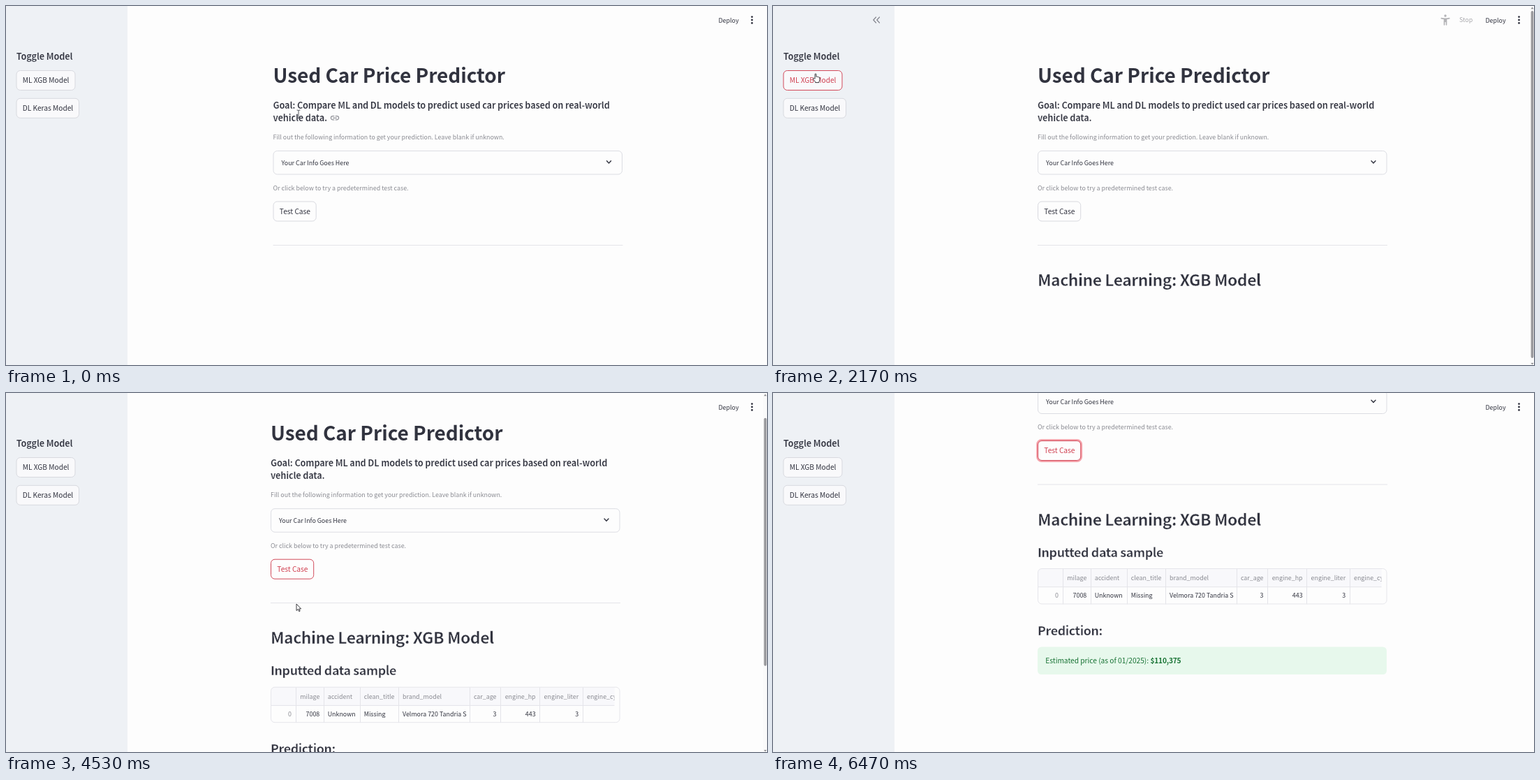
Animation of 1090 by 514 pixels, one loop 6500 ms. Source, as an HTML page:

```html
<!DOCTYPE html>
<html lang="en">
<head>
<meta charset="utf-8">
<title>Used Car Price Predictor</title>
<style>
html, body { margin: 0; width: 100%; height: 100%; overflow: hidden; background: #fdfdfd; }
svg { display: block; width: 1090px; height: 514px; }
text { font-family: "Noto Sans CJK JP", "Noto Sans CJK SC", "Noto Sans CJK", "Open Sans", sans-serif; font-size: 8.9px; fill: #31333f; white-space: pre; }
.h1 { font-size: 28px; font-weight: 700; letter-spacing: -.04px; }
/* a thin background outline lightens bold to semibold */
.h2, .h3, .h5 { font-weight: 600; stroke: #fdfdfd; stroke-width: .018em; }
.h2 { font-size: 22.9px; letter-spacing: -.45px; }
.h3 { font-size: 17.8px; letter-spacing: -.36px; }
.h5 { font-size: 12.7px; letter-spacing: -.16px; }
.h5.side { stroke: #eef1f5; }
.btn text { font-size: 10.17px; }
.btn rect { fill: #fdfdfd; stroke: #d8d9df; }
.btn.side rect { fill: #f9f9fb; }
.btn.red rect { stroke: #d24a5a; }
.btn.red text { fill: #d03f50; }
.btn .ring { display: none; fill: none; stroke-width: 2.4; }
.btn.focus .ring { display: block; stroke: #f5a3ab; }
.cap, .head { fill: #8a8b92; }
.end { text-anchor: end; }
.box { fill: none; stroke: #dcdde3; }
.rule { stroke: #e4e4e9; }
.icon { fill: none; stroke: #31333f; stroke-width: 1.4; stroke-linecap: round; stroke-linejoin: round; }
.soft { stroke: #8f9097; stroke-width: 1.2; }
.good { font-size: 10.17px; fill: #177233; }
.good tspan { font-weight: 700; letter-spacing: -.15px; }
.cur { fill: #fff; stroke: #26262c; stroke-width: .9; stroke-linejoin: round; }
</style>
</head>
<body>
<svg viewBox="0 0 1090 514">
  <defs>
    <g id="chain" class="icon soft">
      <path d="M-1.2 -2.6H-3A2.6 2.6 0 0 0 -3 2.6H-1.2M1.2 -2.6H3A2.6 2.6 0 0 1 3 2.6H1.2M-2.4 0H2.4"/>
    </g>
    <clipPath id="cells"><rect x="380" y="463" width="491.5" height="51"/></clipPath>
  </defs>

  <g id="page">
    <text class="h1" x="379" y="110">Used Car Price Predictor</text>
    <text class="h5" x="379" y="147.3">Goal: Compare ML and DL models to predict used car prices based on real-world</text>
    <text class="h5" x="379" y="164.6">vehicle data.</text>
    <use id="goalLink" href="#chain" x="467.5" y="160.3"/>
    <text class="cap" x="379" y="191.2">Fill out the following information to get your prediction. Leave blank if unknown.</text>
    <rect class="box" x="379.5" y="207.5" width="499.5" height="33.5" rx="5.5"/>
    <text x="391" y="227.6">Your Car Info Goes Here</text>
    <path class="icon" d="M857 221.8L860 225L863 221.8"/>
    <text class="cap" x="379" y="263.9">Or click below to try a predetermined test case.</text>
    <g class="btn" id="test">
      <rect class="ring" x="378.3" y="278.8" width="63.6" height="30.4" rx="6.5"/>
      <rect x="379.5" y="280" width="61.2" height="28" rx="5.5"/>
      <text x="388.3" y="297.6">Test Case</text>
    </g>
    <path class="rule" d="M379 342.5H880"/>

    <g id="model">
      <text class="h2" x="379" y="401">Machine Learning: XGB Model</text>
      <use id="modelLink" href="#chain" x="709.5" y="394.5"/>
    </g>
    <text class="h3" id="sample" x="379" y="446.2">Inputted data sample</text>
    <rect id="skeleton" x="379" y="463" width="500" height="30.5" rx="5.5" fill="#f6f6fa"/>
    <g id="result">
      <path d="M379.5 489.2V468.5a5.5 5.5 0 0 1 5.5 -5.5H871.5V489.2Z" fill="#f8f8fb"/>
      <g id="grid" clip-path="url(#cells)"></g>
      <rect class="box" x="379.5" y="463" width="499.5" height="50.5" rx="5.5" style="stroke:#e6e6eb"/>
      <text class="h3" x="379" y="558.2">Prediction:</text>
      <rect x="379" y="575" width="500" height="39.5" rx="5.5" fill="#e7f8ec"/>
      <text class="good" x="390.3" y="598.5">Estimated price (as of 01/2025): <tspan>$110,375</tspan></text>
    </g>
  </g>

  <rect width="174" height="514" fill="#eef1f5"/>
  <path id="fold" class="icon soft" style="stroke:#85868f" d="M147.5 16L143.8 20L147.5 24M152.5 16L148.8 20L152.5 24"/>
  <text class="h5 side" x="14.7" y="76.8">Toggle Model</text>
  <g class="btn side" id="ml">
    <rect x="15" y="92.5" width="84" height="28" rx="5.5"/>
    <text x="23.7" y="109.9">ML XGB Model</text>
  </g>
  <g class="btn side">
    <rect x="15" y="132.3" width="89.5" height="28" rx="5.5"/>
    <text x="23.7" y="149.8">DL Keras Model</text>
  </g>

  <g id="busy">
    <g class="icon" style="stroke:#b3b3b6;stroke-width:1.6">
      <path d="M957.3 17.6Q963 19 968.7 17.6M961.5 19V27M964.5 19V27M963 19V22.5"/>
      <circle cx="963" cy="14" r=".9"/>
    </g>
    <text x="983" y="23.4" style="fill:#a9a9ad">Stop</text>
  </g>
  <text x="1020.5" y="23.5">Deploy</text>
  <g fill="#31333f">
    <circle cx="1068.5" cy="15.6" r="1.4"/><circle cx="1068.5" cy="20" r="1.4"/><circle cx="1068.5" cy="24.4" r="1.4"/>
  </g>

  <g id="bar">
    <rect x="1084.5" width="5.5" height="514" fill="#fafafa"/>
    <path d="M1085.5 4.3L1087.5 1.5L1089.5 4.3ZM1085.5 511L1087.5 513.6L1089.5 511Z" fill="#8d8d91"/>
    <rect id="thumb" x="1085.6" width="3.8" rx="1.9" fill="#9a9a9e"/>
  </g>

  <g id="cursor">
    <path id="arrow" class="cur" d="M0 0V9.6L2.2 7.5L3.8 10.8L5.2 10.1L3.7 7H6.6Z"/>
    <path id="hand" class="cur" d="M-.9 7.2V.9Q-.9 0 0 0T.9 .9V4.2Q2 3.6 2.6 4.5Q3.8 4 4.4 4.9Q5.8 4.6 5.9 6V8.6Q5.9 10.3 4.8 11.4V12.6H-.4V11.4Q-2.2 9.6 -3.4 7.6Q-3.6 6.5 -2.4 6.4Q-1.6 6.5 -.9 7.2Z"/>
    <path id="beam" class="icon" style="stroke:#55565e;stroke-width:1" d="M-2 -6Q0 -6 0 -5Q0 -6 2 -6M0 -5V5M-2 6Q0 6 0 5Q0 6 2 6"/>
  </g>
</svg>
<script>
const LOOP = 6500;
const $ = id => document.getElementById(id);
const show = (id, on) => { $(id).style.display = on ? '' : 'none'; };

// x, header, value, right aligned
const columns = [
  [409, '', '0', 1], [449.3, 'milage', '7008', 1], [460.7, 'accident', 'Unknown', 0],
  [512.7, 'clean_title', 'Missing', 0], [568, 'brand_model', 'Velmora 720 Tandria S', 0],
  [702.5, 'car_age', '3', 1], [758.6, 'engine_hp', '443', 1], [820.2, 'engine_liter', '3', 1],
  [832, 'engine_cylinder', '', 0]
];
const rules = [415.5, 455.5, 507.5, 562.5, 664.5, 708.5, 764.5, 826.5];
const cell = (x, y, s, right, head) =>
  `<text x="${x}" y="${y}" class="${right ? 'end ' : ''}${head ? 'head' : ''}">${s}</text>`;
$('grid').innerHTML =
  `<path class="rule" d="M379 489.2H872${rules.map(x => `M${x} 463V514`).join('')}"/>` +
  columns.map(([x, h, v, r], i) => cell(x, 479.6, h, r, true) + cell(x, 504.8, v, r, i === 0)).join('');

const path = [
  [0, 419, 155], [200, 419, 155], [900, 61, 97], [2200, 61, 97], [2770, 343.5, 244],
  [3250, 416, 302], [5700, 416, 302], [6150, 560, 530], [LOOP, 560, 530]
];
const scrolling = [
  [0, 0], [4420, 0], [4530, 41.5], [4620, 71], [4700, 90], [4800, 142],
  [4900, 170], [5010, 211.5], [LOOP, 211.5]
];

function at(keys, t, ease) {
  let i = 1;
  while (i < keys.length - 1 && t >= keys[i][0]) i++;
  const a = keys[i - 1], b = keys[i];
  const k = ease(Math.min(1, (t - a[0]) / (b[0] - a[0])));
  return a.slice(1).map((v, j) => v + (b[j + 1] - v) * k);
}
const smooth = k => k * k * (3 - 2 * k);
const linear = k => k;
const between = (v, lo, hi) => v >= lo && v < hi;

function draw(t) {
  const [x, y] = at(path, t, smooth);
  const [scroll] = at(scrolling, t, linear);
  const loaded = t >= 2070, sampled = t >= 4030, done = t >= 4200, left = t >= 6200;
  const shift = loaded ? 0 : 3.5;
  $('page').setAttribute('transform', `translate(${shift} ${-scroll})`);

  const py = y + scroll;
  const onMl = between(x, 15, 99) && between(y, 92, 121);
  const onTest = between(x, 379 + shift, 441 + shift) && between(py, 280, 308);
  const onGoal = t < 900 && between(x, 380, 880) && between(y, 134, 168);
  $('ml').classList.toggle('red', onMl || between(t, 1950, 3900));
  $('test').classList.toggle('red', onTest || t >= 3900);
  $('test').classList.toggle('focus', left);

  show('fold', x < 174);
  show('goalLink', onGoal);
  show('model', loaded);
  show('modelLink', between(t, 4690, 5720));
  show('sample', sampled);
  show('skeleton', sampled && !done);
  show('result', done);
  show('busy', between(t, 2050, 2350) || between(t, 3960, 4350));

  show('bar', loaded && !left);
  $('thumb').setAttribute('y', 7 + scroll * .685);
  $('thumb').setAttribute('height', done ? 355 : sampled ? 426 : 497);

  $('cursor').setAttribute('transform', `translate(${x} ${y})`);
  const hand = onMl || onTest;
  show('hand', hand);
  show('beam', onGoal);
  show('arrow', !hand && !onGoal);
}

const start = performance.now();
function tick(now) {
  draw(Math.max(0, now - start) % LOOP);
  requestAnimationFrame(tick);
}
draw(0);
requestAnimationFrame(tick);
</script>
</body>
</html>
```
